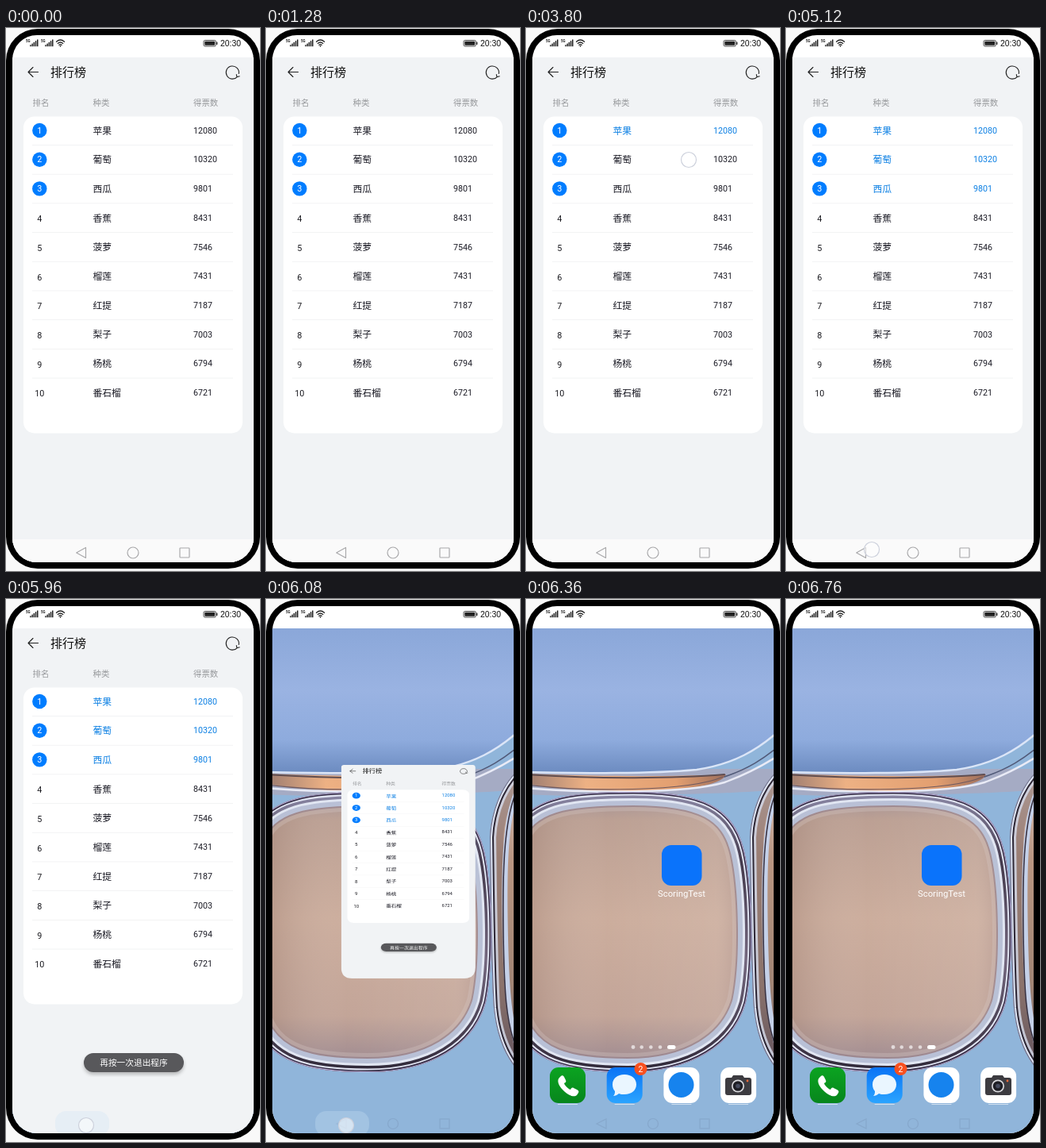
Write an HTML page that moves like this. It is 320 px wide and 684 px high and loops after 6800 ms.

```html
<!DOCTYPE html>
<html lang="zh">
<head>
<meta charset="utf-8">
<title>排行榜</title>
<style>
html, body { margin: 0; width: 100%; height: 100%; overflow: hidden; background: #f9f9f9; }
svg { display: block; width: 100vw; height: 100vh; }
text { font-family: Roboto, "Noto Sans CJK SC", "Noto Sans CJK", sans-serif; }
.cjk { font-family: "Noto Sans CJK SC", "Noto Sans CJK", "Noto Sans CJK JP", sans-serif; }
.mid { text-anchor: middle; }
.line { fill: none; stroke-linecap: round; stroke-linejoin: round; }
</style>
</head>
<body>
<svg viewBox="0 0 320 684" xmlns="http://www.w3.org/2000/svg">
<defs>
  <clipPath id="screen"><rect x="8" y="9" width="304" height="664" rx="31"/></clipPath>
  <clipPath id="below"><rect x="8" y="37" width="304" height="636"/></clipPath>
  <clipPath id="window"><path id="windowShape"/></clipPath>
  <path id="pebble" d="M-20 300 C0 250 50 243 135 243 C222 243 262 262 275 318 C285 362 288 455 277 508 C262 562 208 596 128 596 C60 596 -2 588 -20 520Z"/>
  <clipPath id="pebbleClip"><use href="#pebble"/></clipPath>
  <path id="side" d="M330 205 C300 225 284 262 282 300 C283 370 284 470 287 515 C291 555 304 585 330 606Z"/>
  <clipPath id="sideClip"><use href="#side"/></clipPath>
  <path id="dome" d="M0 30 H320 V165 C292 190 262 208 215 215 C150 221 60 219 0 218Z"/>
  <linearGradient id="sky" x2="0" y2="1">
    <stop offset="0" stop-color="#89a6d8"/><stop offset=".45" stop-color="#9ab3e2"/>
    <stop offset=".78" stop-color="#8eabdd"/><stop offset="1" stop-color="#6c8bc0"/>
  </linearGradient>
  <linearGradient id="peach" x2="0" y2="1">
    <stop offset="0" stop-color="#9b8a90"/><stop offset=".1" stop-color="#b99c8f"/>
    <stop offset=".45" stop-color="#caaa99"/><stop offset=".8" stop-color="#c0a194"/>
    <stop offset="1" stop-color="#93808a"/>
  </linearGradient>
  <linearGradient id="shade">
    <stop offset="0" stop-color="#6d4a3c" stop-opacity=".3"/><stop offset=".4" stop-color="#fff" stop-opacity=".04"/>
    <stop offset=".85" stop-color="#fff" stop-opacity=".12"/><stop offset="1" stop-color="#654c58" stop-opacity=".3"/>
  </linearGradient>
  <linearGradient id="amber">
    <stop offset="0" stop-color="#9b7b70"/><stop offset=".3" stop-color="#edb184"/>
    <stop offset=".75" stop-color="#e39f70"/><stop offset="1" stop-color="#9c6e5c"/>
  </linearGradient>
  <linearGradient id="rim" x2="0" y2="1">
    <stop offset="0" stop-color="#8d8aa8"/><stop offset=".25" stop-color="#433a4c"/>
    <stop offset=".6" stop-color="#74687f"/><stop offset="1" stop-color="#2f2838"/>
  </linearGradient>
  <linearGradient id="bronze" x2="0" y2="1">
    <stop offset="0" stop-color="#d9c6bd"/><stop offset=".3" stop-color="#b99682"/>
    <stop offset=".7" stop-color="#a08474"/><stop offset="1" stop-color="#54475a"/>
  </linearGradient>
  <linearGradient id="green" x2="0" y2="1"><stop offset="0" stop-color="#0ba321"/><stop offset="1" stop-color="#07861c"/></linearGradient>
  <linearGradient id="blue" x2="0" y2="1"><stop offset="0" stop-color="#0a73f5"/><stop offset="1" stop-color="#2ba4ff"/></linearGradient>
  <filter id="soft"><feGaussianBlur stdDeviation="2"/></filter>
</defs>

<rect y="1" width="320" height="680" rx="40"/>
<g clip-path="url(#screen)">
  <rect x="8" y="8" width="304" height="666" fill="#fff"/>

  <g id="home" clip-path="url(#below)">
    <rect x="8" y="37" width="304" height="640" fill="#90b5da"/>
    <path d="M0 214 H320 V240 C270 246 60 250 0 246Z" fill="#a5abc4"/>
    <path d="M0 220 C90 224 190 224 252 221 C246 236 195 242 130 242 C70 242 25 238 0 232Z" fill="url(#amber)"/>
    <g class="line">
      <path d="M0 221 C90 227 190 226 250 221" stroke="#5f4d50" stroke-width="2"/>
      <path d="M0 238 C70 244 200 246 250 231 C275 222 295 212 320 196" stroke="#e9ebf6" stroke-width="2.5"/>
      <path d="M0 234 C70 243 205 243 248 224" stroke="#715b60" stroke-width="1.2"/>
      <path d="M250 224 C280 214 300 201 320 184" stroke="#515a78" stroke-width="1.6"/>
    </g>
    <use href="#dome" fill="url(#sky)"/>
    <path class="line" d="M0 218 C60 219 150 221 215 215 C262 208 292 190 320 165" stroke="#dbe5f7" stroke-width="2.5"/>
    <g id="sideLayers" clip-path="url(#sideClip)"><use href="#side" fill="url(#bronze)"/></g>
    <g id="pebbleLayers" clip-path="url(#pebbleClip)"><use href="#pebble" fill="url(#peach)"/><use href="#pebble" fill="url(#shade)"/></g>
    <g fill="none" stroke="#7f9dc0" stroke-width="1.2" opacity=".55">
      <path d="M89 661 L101 655 V667Z"/><circle cx="160" cy="661" r="6.5"/><rect x="219" y="655" width="12" height="12"/>
    </g>
    <g id="dock">
      <g fill="#fff" fill-opacity=".65">
        <circle cx="135" cy="564.5" r="2.4"/><circle cx="145.7" cy="564.5" r="2.3"/>
        <circle cx="157.3" cy="564.5" r="2.3"/><circle cx="169" cy="564.5" r="2.3"/>
      </g>
      <rect x="178" y="562" width="10.5" height="5" rx="2.5" fill="#fff"/>
      <g id="tiles"></g>
      <path d="M42 603 C39 606 40 612 47 619 C54 626 61 628 64 625 L66 622 C67 620 66 619 64 618 L60 616 C58 615 57 616 56 618 C53 617 49 613 48 610 C50 609 51 608 50 606 L48 602 C47 600 45 600 44 601Z" fill="#fff"/>
      <path d="M124 599 C133 599 139 604 139 611.500 C139 619 133 624 124 624 C121 624 119 624 117 623 C115 625 112 626 110 626 C112 624 112 622 112 620 C110 618 109 615 109 611.500 C109 604 115 599 124 599Z" fill="#eaf6ff"/>
      <circle cx="144.500" cy="592" r="8" fill="#f9501f"/>
      <text class="mid" x="144.500" y="595.800" font-size="10.500" fill="#fff">2</text>
      <circle cx="195.500" cy="612" r="16" fill="#1683ee"/>
      <path d="M254 603 H259 L261 600 H273 L275 603 H281 Q284 603 284 606 V622 Q284 625 281 625 H254 Q251 625 251 622 V606 Q251 603 254 603Z" fill="#3c3b40"/>
      <circle cx="267" cy="613.500" r="8" fill="#d8d8dc"/><circle cx="267" cy="613.500" r="6.300" fill="#1d1d24"/>
      <circle cx="267" cy="613.500" r="2.800" fill="#454a5e"/><circle cx="279" cy="607" r="1.400" fill="#f06a3a"/>
    </g>
    <text id="label" class="mid" x="196" y="374.500" font-size="11.300" fill="#fff">ScoringTest</text>
  </g>

  <g id="app" clip-path="url(#window)"><g id="appBody">
    <rect x="8" y="37" width="304" height="640" fill="#f1f3f5"/>
    <g class="line" stroke="#222" stroke-width="1.100">
      <path d="M40.500 55.500 H28 M34 49.500 L28 55.500 L34 61.500"/>
      <path d="M291.500 61.300 A8.100 8.100 0 1 1 293.300 57.500 M294.200 60.800 L291 61.800 L290.300 58.600"/>
    </g>
    <text class="cjk" x="56" y="60.700" font-size="15" font-weight="500" fill="#111">排行榜</text>
    <g font-size="10.400" fill="#96989b">
      <text class="cjk" x="33.500" y="97.500">排名</text><text class="cjk" x="109.500" y="97.500">种类</text><text class="cjk" x="236" y="97.500">得票数</text>
    </g>
    <rect x="22" y="111.500" width="276" height="399" rx="14" fill="#fff"/>
    <g id="list"></g>
    <g id="toast">
      <rect x="98" y="575" width="126" height="24" rx="12" fill="#333" opacity=".3" filter="url(#soft)"/>
      <rect x="98" y="572" width="126" height="24" rx="12" fill="#58585b"/>
      <text class="cjk mid" x="161" y="588" font-size="10.700" fill="#fff">再按一次退出程序</text>
    </g>
  </g></g>
  <rect id="icon" fill="#0a73fb"/>

  <g id="nav">
    <rect x="8" y="644" width="304" height="30" fill="#fafafa"/>
    <g fill="none" stroke="#a9a9ab" stroke-width="1.200" stroke-linejoin="round">
      <path d="M88.700 661 L100.500 654.500 V667.500Z"/><circle cx="160" cy="661" r="7"/><rect x="219" y="655" width="12" height="12" rx=".8"/>
    </g>
  </g>
  <rect id="ripple" x="62" y="645" width="68" height="32" rx="14" fill="#c9e0f4"/>
  <circle id="touch" r="9.500" fill="#fff" fill-opacity=".55" stroke="#cdd1dc" stroke-width="1.200"/>

  <g id="status">
    <g id="signals"></g>
    <g class="line" stroke="#222" stroke-width="1.300">
      <path d="M63.500 17.300 Q68.500 12.800 73.500 17.300 M65.200 19.400 Q68.500 16.500 71.800 19.400 M66.900 21.300 Q68.500 20 70.100 21.300"/>
    </g>
    <circle cx="68.500" cy="22.800" r=".9" fill="#222"/>
    <rect x="249" y="15.500" width="15.500" height="7.500" rx="1.800" fill="#fff" stroke="#222" stroke-width=".8"/>
    <rect x="250.300" y="16.800" width="12.900" height="4.900" rx=".8" fill="#222"/><rect x="265.300" y="17.600" width="1.200" height="3.300" fill="#222"/>
    <text x="270" y="22.700" font-size="10.400" fill="#111" style="font-family:'Liberation Sans',sans-serif">20:30</text>
  </g>
</g>
</svg>
<script>
const LOOP = 6800, STEP = 40, EXIT = 5960, SHRINK = 380;
const $ = id => document.getElementById(id);
const clamp = v => Math.max(0, Math.min(1, v));
const ramp = (t, a, b) => clamp((t - a) / (b - a));
const mix = (a, b, p) => a + (b - a) * p;
const within = (t, a, b) => t >= a && t < b;
const set = (el, attrs) => { for (const k in attrs) el.setAttribute(k, attrs[k]); };
const fade = (el, a) => set(el, { opacity: a, display: a > 0 ? 'inline' : 'none' });

const first = '苹果 12080,葡萄 10320,西瓜 9801,香蕉 8431,菠萝 7546,榴莲 7431,红提 7187,梨子 7003,杨桃 6794,番石榴 6721';
const second = '西瓜 8836,苹果 8521,香蕉 8431,葡萄 7546,红提 7187,榴莲 7003,番石榴 6794,杨桃 6721,菠萝 6681,梨子 6515';
const parse = s => s.split(',').map(r => r.split(' '));
const boards = [parse(first), parse(second)];
const picked = [3440, 3840, 4200];

// start, end, x, y of each tap
const taps = [
  [1680, 2040, 287, 56], [2320, 2600, 289, 52], [3360, 3560, 210, 130],
  [3760, 3920, 205, 166], [4080, 4320, 203, 203], [5120, 5280, 108, 657], [5800, 6200, 101, 663]
];

// glass rims: [stroke, width, opacity], widest first
function rims(id, shape, layers) {
  $(id).innerHTML += layers.map(([c, w, o]) =>
    `<use href="#${shape}" fill="none" stroke="${c}" stroke-width="${w}" stroke-opacity="${o}"/>`).join('');
}
rims('pebbleLayers', 'pebble', [
  ['#d8c9c6', 48, .3], ['#8a7480', 38, .55], ['#bcc7de', 34, .9], ['#e6eaf5', 22, .9],
  ['url(#rim)', 16, 1], ['#e1e4f2', 9, 1], ['#332b42', 5, 1], ['#b3a8d2', 2, 1]
]);
rims('sideLayers', 'side', [
  ['#6c5b60', 34, .4], ['#d8deee', 16, .8], ['#2d2735', 10, 1], ['#dfe5f4', 6, 1], ['#6c6f8d', 2, 1]
]);
$('sideLayers').innerHTML += '<path class="line" d="M318 240 C302 270 300 330 301 400 C302 470 304 530 318 566" stroke="#c4d0e8" stroke-width="7"/>' +
  '<path class="line" d="M314 246 C299 285 298 350 299 420 C300 490 302 530 314 562" stroke="#3a3342" stroke-width="1.6"/>';

$('tiles').innerHTML = ['url(#green)', 'url(#blue)', '#fff', '#fff'].map((c, i) => {
  const x = 30 + i * 71.7;
  return `<rect x="${x}" y="590" width="45" height="45" rx="11" fill="${c}"/>` +
    `<rect x="${x + 10}" y="636" width="25" height="1" fill="#fff" opacity=".6"/>`;
}).join('');

$('signals').innerHTML = [25, 44].map(x =>
  `<text x="${x}" y="18" font-size="4.5" font-weight="700" fill="#222">5G</text>` +
  [0, 1, 2, 3, 4].map(i => `<rect x="${x + 5.2 + i * 2.2}" y="${21.3 - i * 1.7}" width="1.5" height="${1.9 + i * 1.7}" fill="#222"/>`).join('')
).join('');

$('list').innerHTML = boards[0].map((_, i) => {
  const y = 129 + i * 36.69, top = i < 3;
  return (top ? `<circle cx="42.300" cy="${y}" r="9.200" fill="#007dff"/>` : '') +
    `<text class="mid" x="42.300" y="${y + (top ? 3.8 : 5.2)}" font-size="10.800" fill="${top ? '#fff' : '#1b1b20'}">${i + 1}</text>` +
    `<text class="cjk name" x="109.500" y="${y + 4.5}" font-size="11.800"></text>` +
    `<text class="vote" x="236" y="${y + 3.8}" font-size="10.700"></text>` +
    (i < 9 ? `<rect x="33" y="${y + 18.1}" width="253" height=".8" fill="#eff0f1"/>` : '');
}).join('');
const names = [...document.querySelectorAll('.name')];
const votes = [...document.querySelectorAll('.vote')];

function drawList(t) {
  const rows = boards[within(t, 1840, 2440) ? 1 : 0];
  rows.forEach(([name, vote], i) => {
    const fill = t >= picked[i] ? '#0b7fe3' : '#1b1b25';
    names[i].textContent = name;
    votes[i].textContent = vote;
    set(names[i], { fill });
    set(votes[i], { fill });
  });
}

function drawWindow(t) {
  const u = ramp(t, EXIT, EXIT + SHRINK);
  const px = 1 - (1 - u) ** 2, py = 1 - (1 - u) ** 2.62;
  const x = mix(8, 171, px), w = mix(304, 50.5, px);
  const y = mix(37, 310, py), h = mix(640, 51, py);
  const r = u ? Math.min(14, w / 3) : 0, k = r / 4;
  $('windowShape').setAttribute('d',
    `M${x + k} ${y}h${w - 2 * k}q${k} 0 ${k} ${k}v${h - k - r}q0 ${r} ${-r} ${r}h${2 * r - w}q${-r} 0 ${-r} ${-r}v${k + r - h}q0 ${-k} ${k} ${-k}z`);
  set($('appBody'), { transform: `translate(${x} ${y}) scale(${w / 304} ${h / 640}) translate(-8 -37)` });
  set($('icon'), { x, y, width: w, height: h, rx: 12 });
  fade($('app'), 1 - ramp(t, 6150, 6310));
  fade($('icon'), ramp(t, 6120, 6260));
}

function draw(t) {
  const leaving = t >= EXIT;
  drawList(t);
  drawWindow(t);
  fade($('home'), leaving ? 1 : 0);
  fade($('nav'), leaving ? 0 : 1);
  fade($('dock'), ramp(t, 6100, 6330));
  fade($('label'), ramp(t, 6200, 6350));
  fade($('toast'), ramp(t, 5280, 5480));
  fade($('ripple'), leaving ? .3 * (1 - ramp(t, 6080, 6320)) : 0);
  const tap = taps.find(([a, b]) => within(t, a, b));
  fade($('touch'), tap ? 1 - .7 * ramp(t, 6080, 6200) : 0);
  if (tap) set($('touch'), { cx: tap[2], cy: tap[3] });
}

function tick() {
  const t = performance.now() % LOOP;
  draw(Math.floor(t / STEP) * STEP);
  requestAnimationFrame(tick);
}
tick();
</script>
</body>
</html>
```
